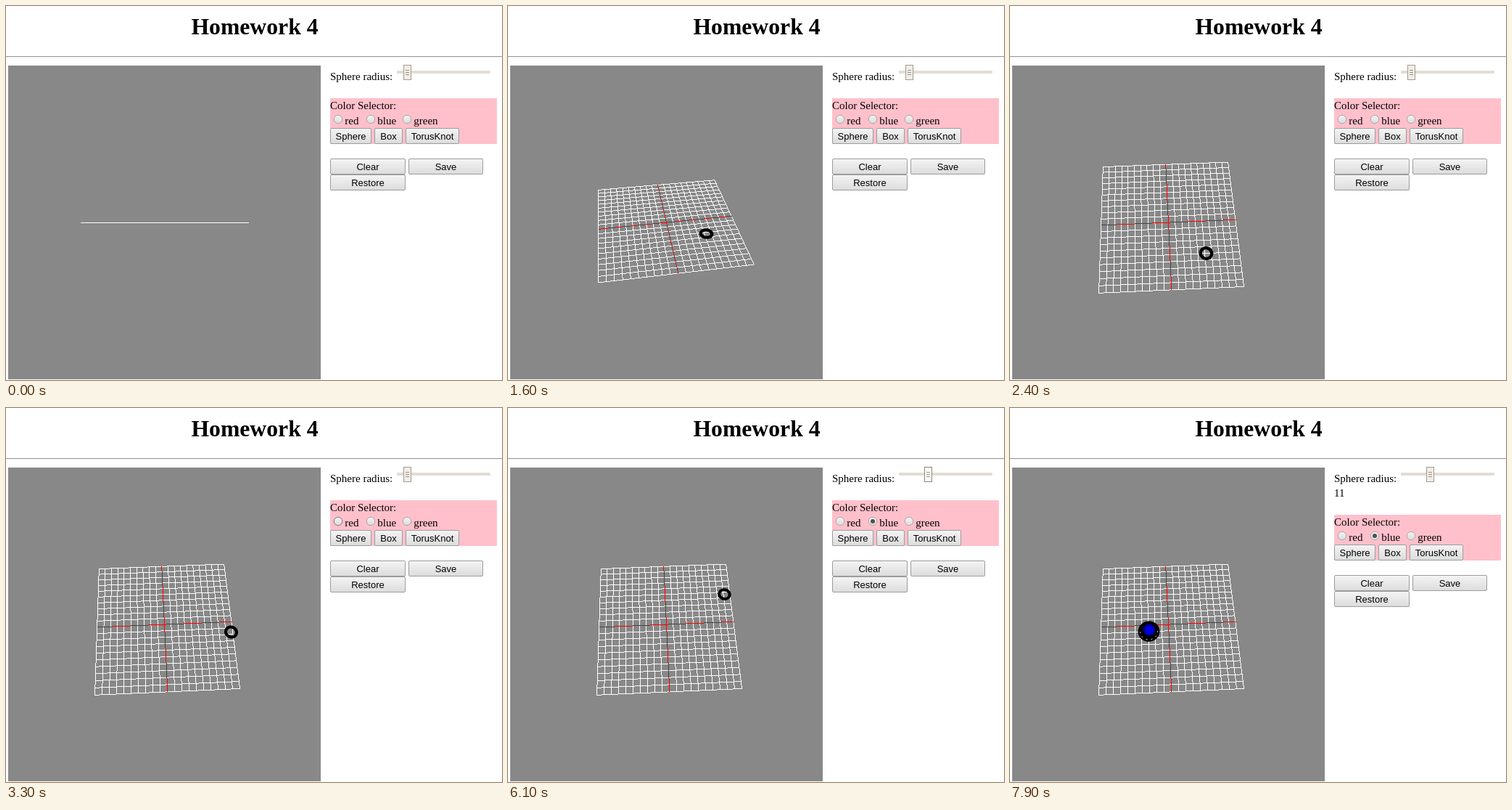
Write an HTML page with a canvas that moves like this. It is 684x515 px and loops after 8000 ms.

```html
<!DOCTYPE html>
<html lang="en">
<head>
<meta charset="utf-8">
<title>Homework 4</title>
<style>
html, body { margin: 0; width: 100%; height: 100%; overflow: hidden; background: #fff; }
canvas { position: absolute; left: 3px; top: 82px; }
svg { position: absolute; left: 0; top: 0; }
text { font: 15px "Liberation Serif", "Times New Roman", serif; }
.title { font-weight: bold; font-size: 31.7px; text-anchor: middle; }
.btn text { font: 13px "Liberation Sans", Arial, sans-serif; text-anchor: middle; }
.btn rect { fill: url(#face); stroke: #9c9c9c; }
.btn.hover rect { fill: url(#lit); stroke: #868686; }
.btn.press rect { fill: url(#down); stroke: #868686; }
.radio circle { fill: url(#face); stroke: #a8a8a8; }
.radio.hover circle { stroke: #7c7c7c; }
.radio .dot { fill: #505050; stroke: none; visibility: hidden; }
.radio.on .dot { visibility: visible; }
.knob rect { fill: #f1ede7; stroke: #a39a8e; }
.knob.hot rect { fill: #fbfaf8; stroke: #8d8478; }
.knob path { stroke: #9a9186; }
</style>
</head>
<body>
<canvas id="view" width="431" height="432"></canvas>
<svg width="684" height="515" viewBox="0 0 684 515">
  <defs>
    <linearGradient id="face" x2="0" y2="1"><stop stop-color="#f4f4f4"/><stop offset="1" stop-color="#dcdcdc"/></linearGradient>
    <linearGradient id="lit" x2="0" y2="1"><stop stop-color="#fafafa"/><stop offset="1" stop-color="#e6e6e6"/></linearGradient>
    <linearGradient id="down" x2="0" y2="1"><stop stop-color="#d4d4d4"/><stop offset="1" stop-color="#ececec"/></linearGradient>
  </defs>
  <text class="title" x="343" y="39">Homework 4</text>
  <path d="M0 69.5H684" stroke="#9a9a9a"/>
  <path d="M0 70.5H684" stroke="#eee"/>
  <text x="447" y="102">Sphere radius:</text>
  <rect x="539" y="89" width="129" height="4" rx="1" fill="#e2dcd5"/>
  <g id="knob" class="knob">
    <rect x="-5.5" y="81.5" width="10" height="20"/>
    <path d="M-3 88.5H2M-3 91.5H2M-3 94.5H2"/>
  </g>
  <text id="value" x="447" y="122">11</text>
  <g id="panel">
    <rect x="447" y="127" width="230" height="63" fill="#ffc0cb"/>
    <text x="447" y="142">Color Selector:</text>
  </g>
</svg>
<script>
const LOOP = 8000;
const $ = id => document.getElementById(id);
const panel = $('panel');

function add(cls, inner) {
  const g = document.createElementNS('http://www.w3.org/2000/svg', 'g');
  g.setAttribute('class', cls);
  g.innerHTML = inner;
  panel.append(g);
  return g;
}
const radio = (label, x) => add('radio',
  `<circle cx="${x}" cy="156" r="5.7"/><circle class="dot" cx="${x}" cy="156" r="3"/>` +
  `<text x="${x + 9.3}" y="163">${label}</text>`);
const button = (label, x, y, w) => add('btn',
  `<rect x="${x + .5}" y="${y + .5}" width="${w - 1}" height="21" rx="1.5"/>` +
  `<text x="${x + w / 2}" y="${y + 16}">${label}</text>`);

const red = radio('red', 458), blue = radio('blue', 503);
radio('green', 553);
const sphereBtn = button('Sphere', 447, 168, 57);
button('Box', 508, 168, 39);
button('TorusKnot', 551, 168, 74);
button('Clear', 447, 210, 104);
button('Save', 555, 210, 103);
button('Restore', 447, 232, 104);

// Timelines: [start ms, ...values], each held until the next entry
const orbit = [ // azimuth (rad), elevation (deg)
  [0, 0, 0], [1400, -.015, 8], [1500, .08, 25], [1600, .15, 40.5],
  [1700, .06, 51], [1800, -.06, 60], [1900, -.13, 67.5], [2200, .044, 68]
];
const pointer = [ // ring centre on the stage
  [0], [1500, 270, 294], [1600, 273, 313], [1700, 267, 327], [1800, 258, 338],
  [1900, 251, 348], [2200, 263, 348], [2400, 270, 340], [2500, 290, 325],
  [2600, 310, 308], [3800, 306, 332], [3900, 270, 362], [4000, 237, 342],
  [4100, 243, 302], [4200, 272, 270], [4300, 298, 256], [7600, 270, 302],
  [7700, 234, 327], [7800, 207, 322], [7900, 191, 307]
];
const sphereState = [
  [0, ''], [2700, 'hover'], [2800, ''], [3700, 'hover'], [3800, ''],
  [6500, 'hover'], [6600, ''], [7200, 'hover'], [7300, 'press'], [7400, '']
];
const slider = [[0, 554, ''], [6000, 566, 'hot'], [6100, 580, 'hot'], [6300, 580, '']];

const at = (list, t) => list.findLast(k => k[0] <= t).slice(1);

// Perspective camera orbiting the grid; half the grid is one unit
const DIST = 5, FOCAL = 216 / Math.tan(25 * Math.PI / 180), CX = 218.5, CY = 298.1;
const ctx = $('view').getContext('2d');
ctx.translate(-3, -82);

function camera(az, deg) {
  const sa = Math.sin(az), ca = Math.cos(az);
  const el = deg * Math.PI / 180, se = Math.sin(el), ce = Math.cos(el);
  return {
    project(x, z) {
      const u = x * ca + z * sa, v = z * ca - x * sa;
      const k = FOCAL / (DIST - v * ce);
      return [CX + u * k, CY + v * se * k, k];
    },
    ground(px, py) {
      const Y = py - CY;
      const v = Y * DIST / (FOCAL * se + Y * ce);
      const u = (px - CX) * (DIST - v * ce) / FOCAL;
      return [u * ca - v * sa, u * sa + v * ca];
    }
  };
}

// One-pixel line without smoothing; color gets the minor coordinate
function line([x0, y0], [x1, y1], color) {
  const flat = Math.abs(x1 - x0) >= Math.abs(y1 - y0);
  let [a0, b0, a1, b1] = flat ? [x0, y0, x1, y1] : [y0, x0, y1, x1];
  if (a0 > a1) [a0, b0, a1, b1] = [a1, b1, a0, b0];
  const slope = (b1 - b0) / (a1 - a0 || 1);
  for (let a = Math.round(a0); a < a1; a++) {
    const b = Math.floor(b0 + (a + .5 - a0) * slope);
    ctx.fillStyle = color(b);
    flat ? ctx.fillRect(a, b, 1, 1) : ctx.fillRect(b, a, 1, 1);
  }
}

function drawGrid(cam, edgeOn) {
  const white = () => '#fff';
  for (let i = -10; i <= 10; i++) {
    if (!i) continue;
    line(cam.project(-1, i / 10), cam.project(1, i / 10), white);
    line(cam.project(i / 10, -1), cam.project(i / 10, 1), white);
  }
  if (edgeOn) return;
  // axes overlap the dark centre lines, so the two alternate per pixel step
  const axis = b => b % 2 ? '#444' : '#f00';
  line(cam.project(-1, 0), cam.project(1, 0), axis);
  line(cam.project(0, -1), cam.project(0, 1), axis);
}

// Circle lying on the grid plane, over the angles 0 to end
function circlePath(cam, x, z, r, end) {
  ctx.beginPath();
  for (let i = 0; i <= 48; i++) {
    const q = i / 48 * end;
    const [px, py] = cam.project(x + r * Math.cos(q), z + r * Math.sin(q));
    ctx.lineTo(px + .5, py + .5);
  }
}

function drawRing(cam, x, z, r, tube) {
  circlePath(cam, x, z, r, 2 * Math.PI);
  ctx.closePath();
  ctx.strokeStyle = '#000';
  ctx.lineWidth = 2 * tube * cam.project(x, z)[2];
  ctx.stroke();
}

function drawSphere(cam, x, z, r) {
  const [px, py, k] = cam.project(x, z);
  const R = r * k, cx = px + .5, cy = py + .5;
  const shade = ctx.createRadialGradient(cx + 1, cy - 2.5, 0, cx + .5, cy - 2, R * .88);
  shade.addColorStop(0, '#0000f4');
  shade.addColorStop(.6, '#0000d0');
  shade.addColorStop(.85, '#000078');
  shade.addColorStop(1, '#000');
  ctx.fillStyle = shade;
  ctx.beginPath();
  ctx.arc(cx, cy, R, 0, 7);
  ctx.fill();
  // light specks along the seam with the ring
  circlePath(cam, x, z, r + .02, Math.PI);
  ctx.strokeStyle = '#fff';
  ctx.lineWidth = 1;
  ctx.setLineDash([2, 5]);
  ctx.stroke();
  ctx.setLineDash([]);
}

function drawScene(t) {
  const [az, el] = at(orbit, t), [mx, my] = at(pointer, t);
  const cam = camera(az, el);
  ctx.fillStyle = '#888';
  ctx.fillRect(3, 82, 431, 432);
  drawGrid(cam, el === 0);
  if (mx === undefined) return;
  const [x, z] = cam.ground(mx, my);
  if (t < 6300) drawRing(cam, x, z, .08, .022);
  else drawRing(cam, x, z, .13, .03);
  if (t >= 7900) drawSphere(cam, x, z, .11);
}

function drawPage(t) {
  const [kx, hot] = at(slider, t);
  $('knob').setAttribute('transform', `translate(${kx})`);
  $('knob').setAttribute('class', 'knob ' + hot);
  const shown = t >= 6300;
  $('value').style.visibility = shown ? 'visible' : 'hidden';
  panel.setAttribute('transform', `translate(0 ${shown ? 20 : 0})`);
  sphereBtn.setAttribute('class', 'btn ' + at(sphereState, t)[0]);
  red.classList.toggle('hover', t >= 3300 && t < 3400);
  red.classList.toggle('on', t >= 3400 && t < 5300);
  blue.classList.toggle('on', t >= 5300);
}

let last = -1;
function tick() {
  const t = Math.floor(performance.now() % LOOP / 100) * 100;
  if (t !== last) {
    last = t;
    drawScene(t);
    drawPage(t);
  }
  requestAnimationFrame(tick);
}
tick();
</script>
</body>
</html>
```
